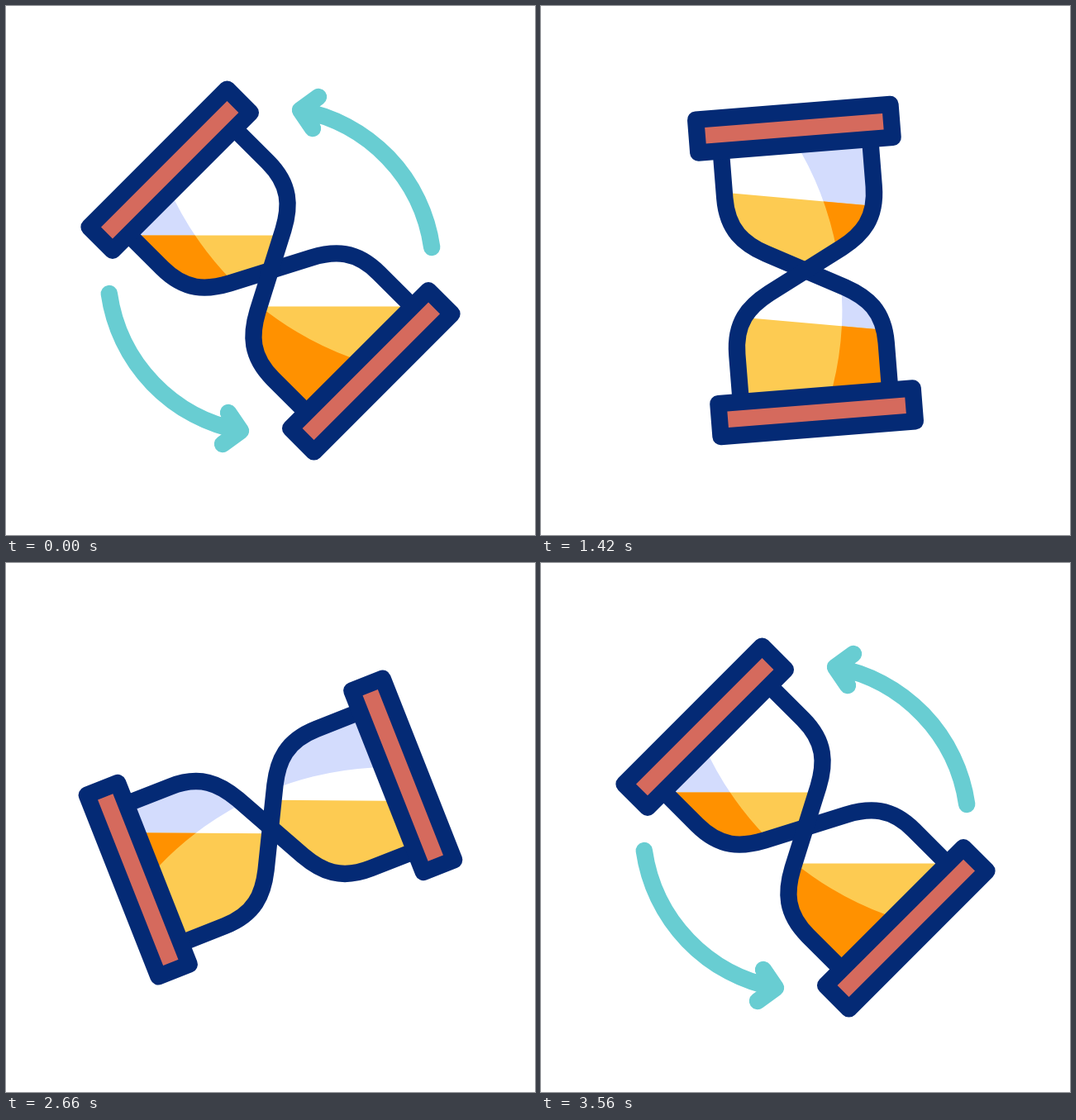
Animation, 640 px wide and 640 px high, one loop 3.6 s. Source, as an HTML page with a canvas:

```html
<!DOCTYPE html>
<html lang="en">
<head>
<meta charset="utf-8">
<title>Hourglass</title>
<style>
html, body { margin: 0; width: 100%; height: 100%; overflow: hidden; background: #fff; }
canvas { display: block; width: 640px; height: 640px; }
</style>
</head>
<body>
<canvas id="stage" width="640" height="640"></canvas>
<script>
const LOOP = 3600;
const NAVY = '#042a75', RED = '#d56a5d', TEAL = '#68cdd2';
const YELLOW = '#fdcb52', ORANGE = '#ff9100', LILAC = '#d3dcfd';
const ctx = document.getElementById('stage').getContext('2d');
const rad = deg => deg * Math.PI / 180;
const smooth = x => x * x * (3 - 2 * x);
const linear = x => x;

// [time, degrees]: wind up, swing past, settle; twice per loop
const TURN = [
  [225, 135], [346, 150], [1243, -16.5], [1540, 2], [1760, 0], [1820, 0],
  [2077, 15], [3251, -240], [3430, -222.8], [3565, -225]
];

// [time, degrees]: slant of the sand surface
const SLANT = [
  [225, 0], [660, 13.2], [1060, 7.8], [1820, 1.9], [2380, 0.8], [2940, 0]
];

// [turn, first bulb, second bulb]: surface height above the neck
const LEVEL = [
  [-240, -25, 28], [-225, -43.5, 42.5], [-196, -78.5, 74], [-135, -35, 50],
  [-90, 18, 18], [-60, 52, -32], [-27, 76.4, -72.6], [0, 87, -61.3],
  [1.3, 88.3, -61.5], [50, 65, -28], [103, 17.8, 17.8], [135, -43.5, 42.5],
  [150, -62, 58]
];

const FADE = [[225, 1], [380, 0], [3270, 0], [3450, 1]];

function sample(rows, x, ease = smooth, col = 1) {
  if (x <= rows[0][0]) return rows[0][col];
  for (let i = 1; i < rows.length; i++) {
    const a = rows[i - 1], b = rows[i];
    if (x < b[0]) return a[col] + (b[col] - a[col]) * ease((x - a[0]) / (b[0] - a[0]));
  }
  return rows[rows.length - 1][col];
}

const bulb = new Path2D(
  'M0 0L-46 -24C-72 -38 -90.5 -56 -90.5 -95V-152H90.5V-95C90.5 -56 72 -38 46 -24Z');
const wall = new Path2D(
  'M-90.5 -150V-95C-90.5 -56 -72 -38 -46 -24L46 24C72 38 90.5 56 90.5 95V150');
const plate = new Path2D('M-118 -192.3H118V-152.2H-118Z');
const shade = new Path2D('M6 -143A388 388 0 0 1 22 142L18 152H200V-160H-1Z');
const arrow = new Path2D('M195.2 -28A197.3 197.3 0 0 0 36 -194M58 -210L36 -194L51 -172');

function group(draw) {
  ctx.save();
  draw();
  ctx.restore();
}

function fill(path, color) {
  ctx.fillStyle = color;
  ctx.fill(path);
}

function sand(side, turn, slant, level) {
  group(() => {
    const clip = new Path2D();
    clip.addPath(bulb, new DOMMatrix([1, 0, 0, side, 0, 0]));
    ctx.clip(clip);
    fill(shade, LILAC);

    const surface = new Path2D();
    const below = new Path2D();
    below.rect(-400, -level, 800, 800);
    surface.addPath(below, new DOMMatrix().rotate(slant - turn));
    fill(surface, YELLOW);
    ctx.clip(surface);
    fill(shade, ORANGE);
  });
}

function hourglass(turn, slant) {
  group(() => {
    ctx.rotate(rad(turn));
    sand(1, turn, slant, sample(LEVEL, turn, linear, 1));
    sand(-1, turn, slant, sample(LEVEL, turn, linear, 2));

    ctx.strokeStyle = NAVY;
    for (const side of [1, -1]) {
      group(() => {
        ctx.scale(side, 1);
        ctx.stroke(wall);
      });
    }
    for (const side of [1, -1]) {
      group(() => {
        ctx.scale(1, side);
        fill(plate, RED);
        ctx.stroke(plate);
      });
    }
  });
}

function arrows(alpha) {
  if (!alpha) return;
  group(() => {
    ctx.globalAlpha = alpha;
    ctx.strokeStyle = TEAL;
    ctx.lineCap = 'round';
    ctx.stroke(arrow);
    ctx.rotate(Math.PI);
    ctx.stroke(arrow);
  });
}

function render(t) {
  ctx.setTransform(1, 0, 0, 1, 0, 0);
  ctx.fillStyle = '#fff';
  ctx.fillRect(0, 0, 640, 640);
  ctx.translate(320, 320);
  ctx.lineWidth = 20.4;
  ctx.lineJoin = 'round';
  arrows(sample(FADE, t, linear));
  hourglass(sample(TURN, t), sample(SLANT, t));
}

const start = performance.now();
function tick() {
  render((performance.now() - start) % LOOP);
  requestAnimationFrame(tick);
}
tick();
</script>
</body>
</html>
```
